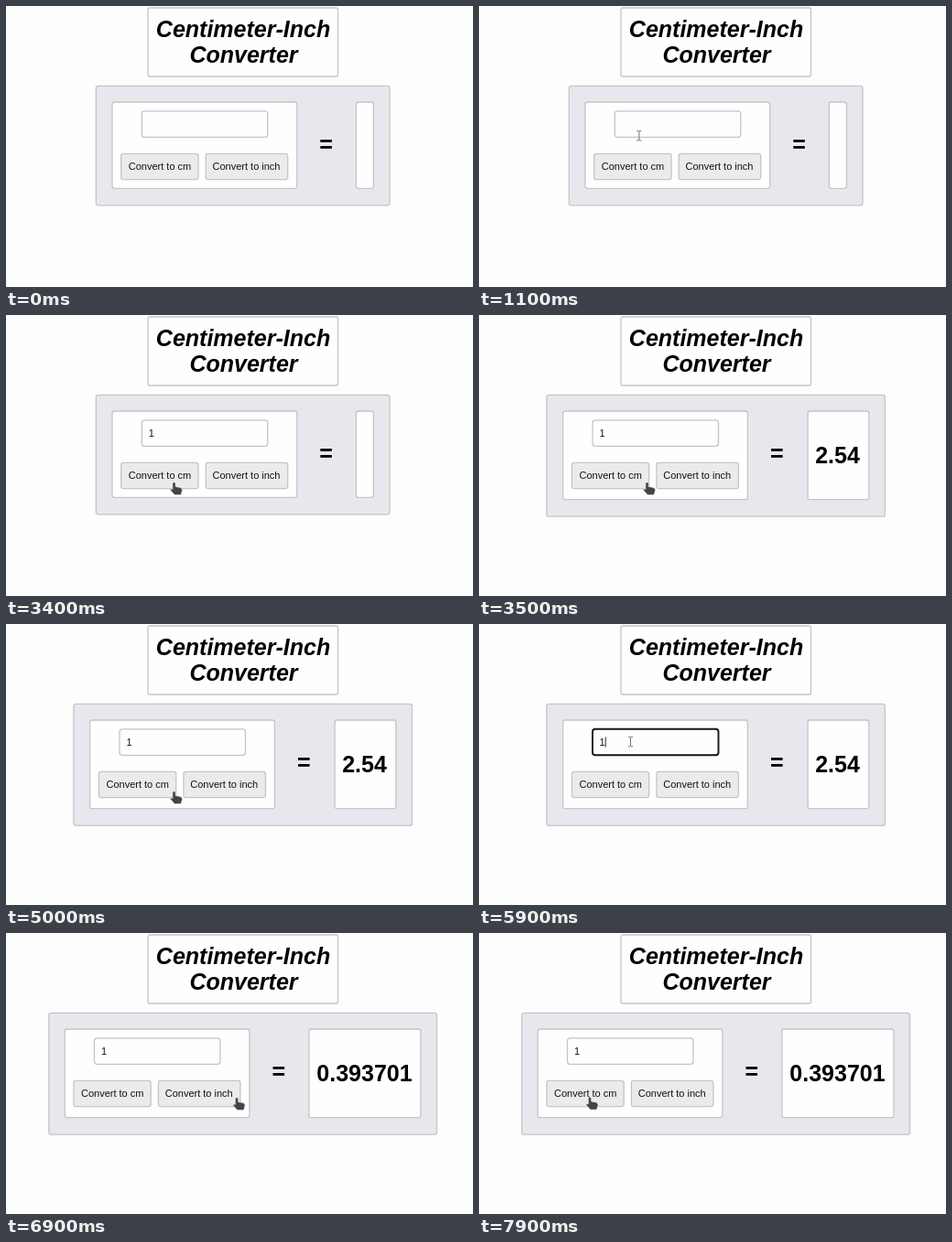
An HTML page that plays this animation: 510 px wide and 307 px high, repeating every 8000 ms.

```html
<!DOCTYPE html>
<html lang="en">
<head>
<meta charset="utf-8">
<title>Centimeter-Inch Converter</title>
<style>
html, body { margin: 0; width: 100%; height: 100%; overflow: hidden; background: #fdfdfd; }
svg { display: block; width: 510px; height: 307px; font: 11px "Liberation Sans", Arial, sans-serif; fill: #111; }
.big { font-size: 25px; font-weight: bold; fill: #000; text-anchor: middle; }
.title { font-style: italic; }
.box { fill: #fefefe; stroke: #c5c5c7; stroke-width: 1.3; }
.button { fill: #ebebec; }
.label { text-anchor: middle; }
#panel { fill: #e7e8ed; }
#input.focused { stroke: #151518; stroke-width: 1.9; }
#cursor { fill: #444446; stroke: #f4f4f4; stroke-width: .5; }
#beam { fill: none; stroke: #707074; stroke-width: 1; }
</style>
</head>
<body>
<svg viewBox="0 0 510 307">
  <rect class="box" x="155" y="2" width="207.5" height="75" rx="2"/>
  <text class="big title" x="259" y="34">Centimeter-Inch</text>
  <text class="big title" x="259.5" y="62.3">Converter</text>

  <rect id="panel" class="box" y="87.3" rx="2.5"/>
  <g id="form">
    <rect id="card" class="box" x="116" y="105" width="201.7" rx="2.5"/>
    <rect id="input" class="box" x="148.3" y="114.8" width="137.5" height="28.5" rx="3"/>
    <text id="typed" x="155.7" y="133">1</text>
    <path id="caret" d="M0 123.5v11" stroke="#222" stroke-width="1"/>
    <rect class="box button" x="125.7" y="161.3" width="84.3" height="28.3" rx="2.5"/>
    <rect class="box button" x="218.2" y="161.3" width="89.5" height="28.3" rx="2.5"/>
    <text class="label" x="168" y="179">Convert to cm</text>
    <text class="label" x="262.5" y="179">Convert to inch</text>
    <text class="big" x="349.6" y="159.7">=</text>
  </g>
  <rect id="output" class="box" y="105" rx="2.5"/>
  <text id="result" class="big" x="391.5" y="162"></text>

  <g id="cursor">
    <path id="arrow" d="M0 0V12.5L3 9.8L5 14L7 13L5 9H9Z"/>
    <path id="hand" d="M-1.6 1.2Q0 -.8 1.6 1.2V5L6.6 6Q9.2 6.6 9 8.8L7.6 14H.6L-4 8.8Q-4.2 6.6 -1.6 8Z"/>
    <path id="beam" d="M-2.5 -5.3H-.8L0 -4.5L.8 -5.3H2.5M0 -4.5V4.5M-2.5 5.3H-.8L0 4.5L.8 5.3H2.5"/>
  </g>
</svg>
<script>
const LOOP = 8000, STEP = 100;
const $ = id => document.getElementById(id);
const set = (id, attrs) => {
  for (const name in attrs) $(id).setAttribute(name, attrs[name]);
};
const show = (id, on) => set(id, { visibility: on ? "visible" : "hidden" });

// Each conversion widens the output and re-centres the row.
const layouts = [
  { from: 0, shift: 0, left: 98.3, right: 419, out: 19, height: 94.3, text: "" },
  { from: 3500, shift: -24.3, left: 73.9, right: 443.4, out: 66.7, height: 96.7, text: "2.54" },
  { from: 6900, shift: -51.8, left: 46.8, right: 470.5, out: 122, height: 96.7, text: "0.393701" }
];
const focusSpans = [[1400, 3400], [5900, 6800]];

// Cursor hot spot: time, x, y
const path = [
  [500, 10, 298], [1200, 184.5, 132.5], [2700, 184.5, 132.5],
  [3000, 184, 183.3], [3100, 184, 183.3], [3200, 183.5, 182.5],
  [5000, 183.5, 182.5], [5350, 152, 152], [5700, 165.5, 128.5],
  [6000, 165.5, 128.5], [6600, 252, 179.5], [7100, 252, 179.5], [7900, 121, 179]
];

function cursorAt(t) {
  const i = path.findIndex(key => key[0] > t);
  if (i < 0) return path[path.length - 1].slice(1);
  if (i === 0) return path[0].slice(1);
  const [t0, x0, y0] = path[i - 1], [t1, x1, y1] = path[i];
  const p = (t - t0) / (t1 - t0), e = p * p * (3 - 2 * p);
  return [x0 + (x1 - x0) * e, y0 + (y1 - y0) * e];
}

function cursorShape(x, y) {
  const within = (left, top, right, bottom) => x > left && x < right && y > top && y < bottom;
  if (within(148, 114, 286, 144)) return "beam";
  if (within(125, 161, 210.5, 190) || within(218, 161, 308, 190)) return "hand";
  return "arrow";
}

function draw(t) {
  const layout = layouts.filter(l => t >= l.from).pop();
  const { shift, left, right, out, height, text } = layout;
  set("panel", { x: left, width: right - left, height: height + 36.2 });
  set("form", { transform: `translate(${shift} 0)` });
  set("card", { height });
  set("output", { x: right - 17.6 - out, width: out, height });
  $("result").textContent = text;

  const focus = focusSpans.find(([start, end]) => t >= start && t < end);
  const typed = t >= 2400;
  $("input").classList.toggle("focused", !!focus);
  show("typed", typed);
  show("caret", focus && Math.floor((t - focus[0]) / 500) % 2 === 0);
  set("caret", { transform: `translate(${typed ? 162.5 : 156} 0)` });

  const [x, y] = cursorAt(t);
  const shape = cursorShape(x - shift, y);
  set("cursor", { transform: `translate(${x} ${y})` });
  for (const id of ["arrow", "hand", "beam"]) show(id, t >= 500 && id === shape);
}

const start = performance.now();
function tick() {
  const t = (performance.now() - start) % LOOP;
  draw(Math.floor(t / STEP) * STEP);
  requestAnimationFrame(tick);
}
tick();
</script>
</body>
</html>
```
